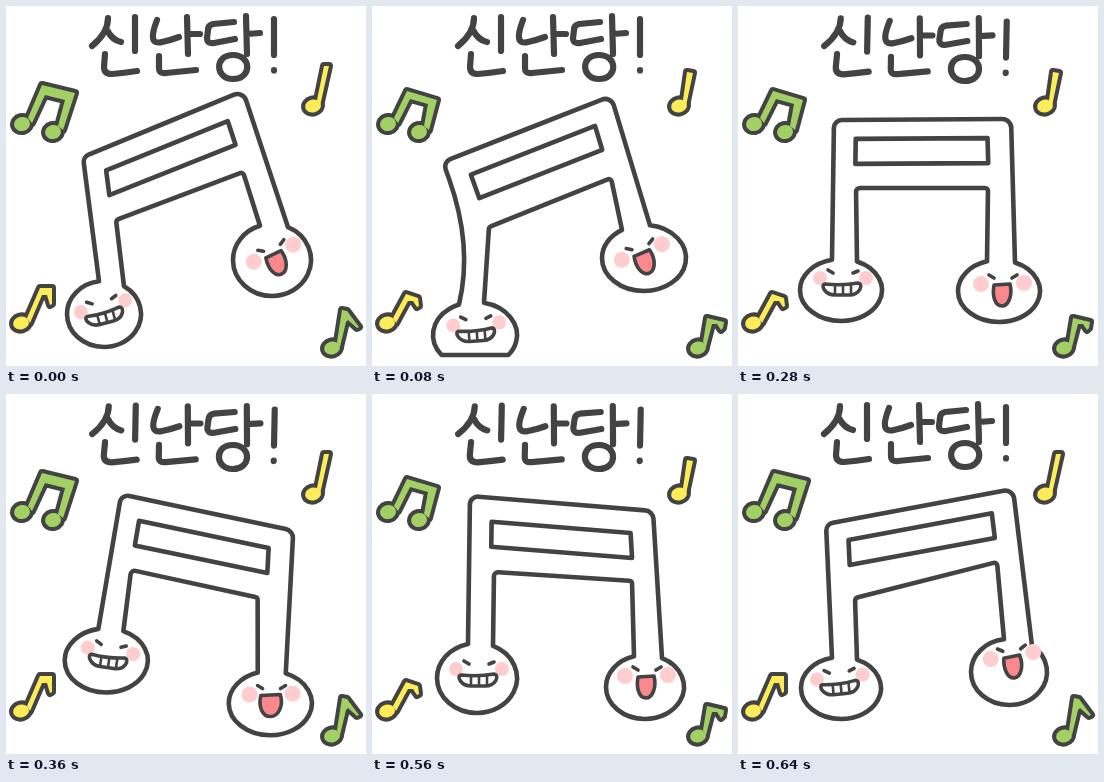
Write an HTML page with a canvas that moves like this. It is 360 by 360 pixels and loops after 720 ms.

```html
<!DOCTYPE html>
<html lang="ko">
<head>
<meta charset="utf-8">
<title>신난당!</title>
<style>
  html, body { margin: 0; width: 100%; height: 100%; overflow: hidden; background: #fff; }
  canvas { display: block; width: 100vw; height: 100vh; }
</style>
</head>
<body>
<canvas id="stage" role="img" aria-label="신난당!"></canvas>
<script>
const INK = '#434343', GREEN = '#a3d065', YELLOW = '#fdec5a', BLUSH = '#ffcdcd', RED = '#fa888c';
const LOOP = 720;
const canvas = document.getElementById('stage');
const ctx = canvas.getContext('2d');

// bar: outer corners; gap: corners between the stems; L, R: heads as cx, cy, rx, ry
// feet: left edge of each stem from its head's centre; drop: depth of the slot
// grin: x, y, turn; laugh: x, y, turn, mouth width
const tilt = {
  bar: [77, 151, 237, 85], gap: [110, 214, 237, 166],
  L: [98, 308, 37, 33], R: [266, 254, 39, 36], feet: [-5, -12], drop: 22,
  grin: [99, 311, -15], laugh: [271, 257, -22, 1.05]
};
const stomp = {
  ...tilt, bar: [71, 156, 239, 90], gap: [117, 221, 239, 172],
  L: [103, 329, 42, 33], R: [272, 252, 42, 33], feet: [-16, -22],
  grin: [104, 329, -4], laugh: [273, 256, -20, 1.05], floor: { L: 349 }, bend: { L: [101, 240] }
};
const back = {
  bar: [83, 138, 252, 100], gap: [113, 210, 242, 176],
  L: [107, 307, 38, 31], R: [264.5, 275, 41, 35], feet: [-5, -15], drop: 22,
  grin: [107, 313, -2], laugh: [269, 277, -15, 1]
};
const level = {
  bar: [96, 114, 273, 113], gap: [118, 182, 250, 182],
  L: [103, 284, 41, 31], R: [261, 285, 41, 31], feet: [-9, -12], drop: 19,
  grin: [104, 283, 0], laugh: [264, 288, 0, 1]
};
const dip = {
  bar: [131, 89, 299, 156], gap: [131, 171, 253, 221],
  L: [98, 252, 42, 33], R: [267, 329, 42, 33], feet: [-7, -13], drop: 25,
  grin: [100, 255, 15], laugh: [265, 329, 0, 1.4], floor: { R: 349 }, bend: { R: [268, 240] }
};
const rise = {
  bar: [98, 102, 281, 117], gap: [122, 178, 260, 187],
  L: [105, 284, 40, 35], R: [273, 293, 39, 32], feet: [-9, -11], drop: 24,
  grin: [106, 286, 0], laugh: [274, 292, 0, 1]
};
const swing = {
  bar: [88, 130, 275, 95], gap: [117, 204, 259, 168],
  L: [103, 294, 40, 31], R: [271, 278, 38, 33], feet: [-9, -5], drop: 20,
  grin: [102, 294, -6], laugh: [275, 272, -8, 1]
};

function blend(a, b, k) {
  const mix = (p, q) => Array.isArray(p) ? p.map((n, i) => mix(n, q[i])) : p + (q - p) * k;
  return Object.fromEntries(Object.keys(a).map(key => [key, mix(a[key], b[key])]));
}

// start time, body pose, small-note pose, lettering tilt
const steps = [
  [0, tilt, 0, 0], [80, stomp, 2, 0], [200, back, 1, 0], [280, level, 2, 1],
  [360, blend(level, dip, 0.55), 0, 1], [440, dip, 1, 1], [560, rise, 2, 1], [640, swing, 0, 0]
];

function ink(width) {
  ctx.strokeStyle = INK;
  ctx.lineWidth = width;
  ctx.stroke();
}

function paint(fill, width) {
  ctx.fillStyle = fill;
  ctx.fill();
  ink(width);
}

function line(...p) {
  ctx.moveTo(p[0], p[1]);
  for (let i = 2; i < p.length; i += 2) ctx.lineTo(p[i], p[i + 1]);
}

function local(x, y, deg, draw) {
  ctx.save();
  ctx.translate(x, y);
  ctx.rotate(deg * Math.PI / 180);
  draw();
  ctx.restore();
}

function dot(x, y, rx, ry, fill) {
  ctx.beginPath();
  ctx.ellipse(x, y, rx, ry, 0, 0, 7);
  ctx.fillStyle = fill;
  ctx.fill();
}

function onHead([cx, cy, rx, ry], dx) {
  return [cx + dx, cy - ry * Math.sqrt(1 - (dx / rx) ** 2)];
}

// Clockwise outline of a head from one stem side to the other, cut off at the floor
function head(h, from, to, floor) {
  const [cx, cy, rx, ry] = h;
  const angle = dx => {
    const [x, y] = onHead(h, dx);
    return Math.atan2((y - cy) / ry, (x - cx) / rx);
  };
  const cut = floor ? Math.asin((floor - cy) / ry) : Math.PI / 2;
  ctx.ellipse(cx, cy, rx, ry, 0, angle(from), cut);
  ctx.ellipse(cx, cy, rx, ry, 0, Math.PI - cut, angle(to));
}

function body({ bar, gap, L, R, feet, drop, floor = {}, bend = {} }) {
  const [x1, y1, x2, y2] = bar;
  const l1 = feet[0], l2 = l1 + 25, r1 = feet[1], r2 = r1 + 28;
  const footL = onHead(L, l1), footR = onHead(R, r2);
  const bendL = bend.L || footL, bendR = bend.R || footR;
  const near = (a, b, k) => a + (b - a) * k;

  ctx.beginPath();
  ctx.moveTo((x1 + x2) / 2, (y1 + y2) / 2);
  ctx.arcTo(x2, y2, ...bendR, 9);
  ctx.quadraticCurveTo(...bendR, ...footR);
  head(R, r2, r1, floor.R);
  ctx.arcTo(gap[2], gap[3], gap[0], gap[1], 3);
  ctx.arcTo(gap[0], gap[1], ...onHead(L, l2), 4);
  head(L, l2, l1, floor.L);
  ctx.quadraticCurveTo(...bendL, near(bendL[0], x1, 0.8), near(bendL[1], y1, 0.8));
  ctx.arcTo(x1, y1, x2, y2, 8);
  ctx.closePath();
  paint('#fff', 4.6);

  const unit = (x, y) => [x / Math.hypot(x, y), y / Math.hypot(x, y)];
  const u = unit(x2 - x1, y2 - y1);
  const vl = unit(bendL[0] - x1, bendL[1] - y1), vr = unit(bendR[0] - x2, bendR[1] - y2);
  const at = (x, y, v, a, b) => [x + u[0] * a + v[0] * b, y + u[1] * a + v[1] * b];
  ctx.beginPath();
  line(...at(x1, y1, vl, 22, drop), ...at(x2, y2, vr, -24, drop),
       ...at(x2, y2, vr, -24, drop + 25), ...at(x1, y1, vl, 22, drop + 25));
  ctx.closePath();
  ink(4.6);
}

function grin([x, y, deg]) {
  local(x, y, deg, () => {
    dot(-22, -11, 7, 7, BLUSH);
    dot(24, -11, 7, 7, BLUSH);
    ctx.beginPath();
    line(-14, -19, -9, -16);
    line(11, -16, 16, -18);
    ink(3.6);
    ctx.beginPath();
    ctx.moveTo(-17, -5);
    ctx.quadraticCurveTo(0, -3, 16, -6);
    ctx.bezierCurveTo(22, -5, 18, 6, 7, 6);
    ctx.lineTo(-7, 6);
    ctx.bezierCurveTo(-17, 6, -22, -4, -17, -5);
    ctx.closePath();
    paint('#fff', 3.6);
    ctx.beginPath();
    line(-7, -4, -7, 5);
    line(1, -4, 1, 5);
    line(9, -5, 9, 5);
    ink(2.6);
  });
}

function laugh([x, y, deg, s]) {
  local(x, y, deg, () => {
    dot(-21, -10, 8, 8, BLUSH);
    dot(22, -11, 8, 8, BLUSH);
    ctx.beginPath();
    line(-13, -19, -8, -16);
    line(10, -16, 15, -19);
    ink(3.6);
    ctx.beginPath();
    ctx.moveTo(-8 * s, -9);
    ctx.lineTo(8 * s, -10);
    ctx.bezierCurveTo(11 * s, 2, 6 * s, 12, 0, 12);
    ctx.bezierCurveTo(-7 * s, 12, -10 * s, 2, -8 * s, -9);
    ctx.closePath();
    paint(RED, 3.6);
  });
}

// Heads and stem pieces are outlined first, then filled as one shape
function note(fill, heads, stem) {
  const shape = new Path2D();
  for (const [x, y, rx, ry] of heads) {
    const e = new Path2D();
    e.ellipse(x, y, rx, ry, -0.25, 0, 7);
    shape.addPath(e);
  }
  const poly = new Path2D('M' + stem.join(' ') + 'Z');
  ctx.strokeStyle = INK;
  ctx.lineWidth = 8;
  ctx.stroke(shape);
  ctx.stroke(poly);
  ctx.fillStyle = fill;
  ctx.fill(shape);
  ctx.fill(poly);
}

const beams = [
  [36, 79, 69, 87, 59, 94, 39, 89],
  [31, 86, 63, 98, 54, 102, 36, 97],
  [35, 85, 65, 94, 56, 98, 38, 93]
];
const sticks = [[318, 60, 323, 60], [313, 68, 319, 68], [315, 66, 321, 67]];
const flagsL = [
  [34, 282, 46, 282, 46, 298, 44, 299, 41, 289, 36, 289],
  [32, 288, 41, 289, 49, 303, 47, 304, 39, 295, 35, 295],
  [34, 288, 46, 292, 47, 300, 45, 301, 41, 295, 36, 295]
];
const flagsR = [
  [336, 304, 341, 305, 353, 321, 351, 322, 342, 314, 340, 316],
  [332, 313, 351, 319, 352, 323, 350, 325, 344, 320, 338, 319],
  [335, 312, 352, 316, 351, 322, 349, 324, 345, 318, 340, 318]
];

function notes(k) {
  const [ax, ay, bx, by, cx, cy, dx, dy] = beams[k];
  note(GREEN, [[16, 118, 8, 7], [47, 126, 8, 7]],
    [22, 112, ax, ay, bx, by, 57, 124, 52, 120, cx, cy, dx, dy, 26, 117]);
  note(YELLOW, [[307, 100, 8, 6.5]], [311, 94, ...sticks[k], 314, 100]);
  note(YELLOW, [[15, 317, 8, 6.5]], [21, 312, ...flagsL[k], 24, 317]);
  note(GREEN, [[326, 342, 8, 6.5]], [331, 336, ...flagsR[k], 334, 341]);
}

const letters = new Path2D([
  'M102 12Q102 27 86 40M101 24Q106 34 115 36M129 11L129 45M99 48L98 61Q98 68 106 68Q118 67 131 65',
  'M151 14Q146 27 147 32Q148 38 156 36Q165 34 173 31M181 11L182 48M182 28L194 28M153 50L153 62Q153 68 160 67L190 64',
  'M228 16L207 18Q202 19 202 24L201 32Q201 38 208 37L229 33M240 10L241 48M241 28L254 27',
  'M227 49C208 49 209 73 227 73C246 73 246 49 227 49M268 13L268 49M268 64L268 64.5'
].join(''));

function lettering(k) {
  ctx.save();
  if (k) ctx.transform(1, 0.014, -0.02, 1, 1, -1.2);
  ctx.strokeStyle = INK;
  ctx.lineWidth = 6.2;
  ctx.stroke(letters);
  ctx.restore();
}

function draw(now) {
  const w = Math.round(innerWidth * devicePixelRatio), h = Math.round(innerHeight * devicePixelRatio);
  if (canvas.width !== w || canvas.height !== h) {
    canvas.width = w;
    canvas.height = h;
  }
  ctx.setTransform(w / 360, 0, 0, h / 360, 0, 0);
  ctx.fillStyle = '#fff';
  ctx.fillRect(0, 0, 360, 360);
  ctx.lineCap = ctx.lineJoin = 'round';

  const t = now % LOOP;
  const [, pose, small, lean] = steps.filter(s => s[0] <= t).pop();
  lettering(lean);
  notes(small);
  body(pose);
  grin(pose.grin);
  laugh(pose.laugh);
}

const start = performance.now();
function tick() {
  draw(performance.now() - start);
  requestAnimationFrame(tick);
}
tick();
</script>
</body>
</html>
```
